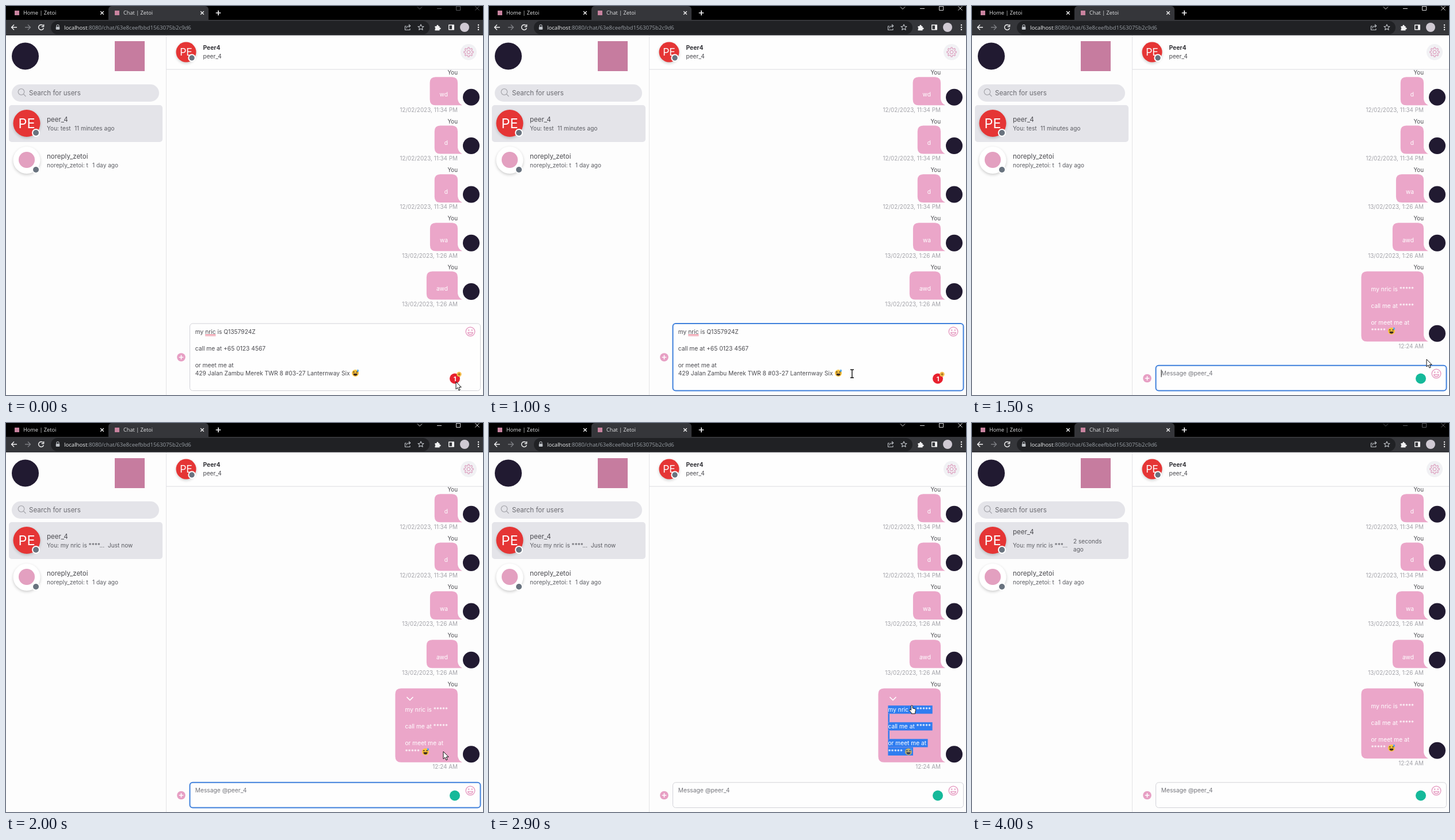
These frames come from a looping animation (829x675 px, 4100 ms). An HTML page with a canvas:

```html
<!DOCTYPE html>
<html lang="en">
<head>
<meta charset="utf-8">
<title>Chat</title>
<style>
html, body { margin: 0; width: 829px; height: 675px; overflow: hidden; background: #fdfdfd; }
canvas { display: block; }
</style>
</head>
<body>
<canvas id="stage" width="829" height="675"></canvas>
<script>
const ctx = document.getElementById('stage').getContext('2d');
const LOOP = 4100, STEP = 100;
const PINK = '#eba6c9', DARK = '#211a31', GREY = '#e4e4e9', RED = '#e53535';

// Moments (ms) at which the state changes
const FOCUS = 400, SENT = 1200, HOVER = 1800, UPDATED = 1700, SELECT = 2400,
      LEAVE = 3100, ONE_SECOND = 3000, BLUR = 3800, TWO_SECONDS = 3900;
const PATH = [[0, 782, 652], [700, 631, 638], [1100, 631, 638], [1500, 790, 613],
              [2000, 760, 570], [2400, 715, 480], [2800, 715, 480], [3200, 842, 540]];

function text(str, x, y, { size = 10.1, color = '#4b4b50', weight = 400, align = 'left', family = 'Inter' } = {}) {
  ctx.font = `${weight} ${size}px ${family}, sans-serif`;
  ctx.textAlign = align;
  ctx.fillStyle = color;
  ctx.fillText(str, x, y);
  return ctx.measureText(str).width;
}
function box(x, y, w, h, fill, r = 0) {
  ctx.fillStyle = fill;
  ctx.beginPath();
  ctx.roundRect(x, y, w, h, r);
  ctx.fill();
}
function disc(x, y, r, fill) {
  ctx.fillStyle = fill;
  ctx.beginPath();
  ctx.arc(x, y, r, 0, 7);
  ctx.fill();
}
function icon(x, y, d, { stroke, fill, width = 1.4 } = {}) {
  const path = new Path2D(d);
  ctx.save();
  ctx.translate(x, y);
  ctx.lineWidth = width;
  ctx.lineJoin = 'round';
  if (fill) { ctx.fillStyle = fill; ctx.fill(path); }
  if (stroke) { ctx.strokeStyle = stroke; ctx.stroke(path); }
  ctx.restore();
}
const ring = r => `M${r} 0A${r} ${r} 0 1 1 ${-r} 0A${r} ${r} 0 1 1 ${r} 0`;
const cross = r => `M${-r} ${-r}L${r} ${r}M${r} ${-r}L${-r} ${r}`;
const plus = r => `M${-r} 0H${r}M0 ${-r}V${r}`;

function browser(active) {
  const ui = { family: 'Open Sans', size: 9.2, color: '#e3e4e6' };
  const white = { stroke: '#f1f1f2' }, soft = { stroke: '#bdc1c6', width: 1.1 };
  box(0, 0, 829, 25, '#000');
  box(178, 0, 174, 26, '#35363a', [6, 6, 0, 0]);
  box(0, 24, 829, 27, '#35363a');
  box(78, 26, 658, 23, '#202124', 11.5);
  ['Home', 'Chat'].forEach((name, i) => {
    box(15 + i * 174, 8, 8, 8, '#c9839f');
    text(`${name} | Zetoi`, 30 + i * 174, 15, ui);
    icon(167 + i * 174, 12, cross(2.8), white);
  });
  icon(369, 12, plus(4.3), { stroke: '#f1f1f2', width: 1.7 });
  const win = { stroke: active ? '#d5d5d7' : '#55565a', width: 1 };
  icon(719, 3, 'M-4 -1.5L0 2.5L4 -1.5', win);
  icon(753, 4.5, 'M-4 0H4', win);
  icon(786, 4, 'M-3.5 -3.5H3.5V3.5H-3.5Z', win);
  icon(819, 4, cross(3.6), win);

  icon(14, 37, 'M5 0H-4M0 -4.5L-4.5 0L0 4.5', white);
  icon(38, 37, 'M-5 0H4M0 -4.5L4.5 0L0 4.5', { stroke: '#7d7f83' });
  icon(61, 37, 'M3.5 -3A4.5 4.5 0 1 0 4.4 1.2M4.6 -5V-1.3H.8', white);
  icon(90, 37, 'M-2 -1V-2.5A2 2 0 0 1 2 -2.5V-1', soft);
  box(86.7, 36, 6.6, 5, '#bdc1c6', 1);
  const host = text('localhost', 101, 40.5, { ...ui, size: 9.65, color: '#f1f3f4' });
  text(':8080/chat/63e8ceefbbd1563075b2c9d6', 101 + host, 40.5, { ...ui, size: 9.65, color: '#9aa0a6' });
  icon(698, 37, 'M-2 -2H-4.5V4.5H4V2M-2 2C-2 -1 0 -2.5 4.5 -2.5M2 -5L4.8 -2.5L2 0', soft);
  icon(721, 37, 'M0 -5L1.5 -1.7L5 -1.4L2.4 .9L3.2 4.4L0 2.6L-3.2 4.4L-2.4 .9L-5 -1.4L-1.5 -1.7Z', soft);
  icon(750, 38, 'M-4.5 -3H-1.5A1.6 1.6 0 1 1 1.5 -3H3.5V-.5A1.6 1.6 0 1 1 3.5 2.5V4.5H-4.5V2A1.5 1.5 0 0 0 -4.5 -.6Z', { fill: '#f1f1f2' });
  icon(774, 37, 'M-4.3 -4H4.3V4H-4.3Z', white);
  box(775, 33, 4, 8, '#f1f1f2');
  disc(797, 37, 8, '#cfc9d2');
  [33, 37, 41].forEach(y => disc(821, y, 1.2, '#f1f1f2'));
}

function shadow(draw) {
  ctx.save();
  ctx.shadowColor = '#0003';
  ctx.shadowBlur = 5;
  ctx.shadowOffsetY = 2;
  draw();
  ctx.restore();
}
function status(x, y, r, rim) {
  disc(x, y, r + 2, rim);
  disc(x, y, r, '#69737f');
}
function initials(x, y, r, rim) {
  shadow(() => disc(x, y, r, RED));
  text('PE', x, y + r * 0.36, { size: r, color: '#fff', align: 'center' });
  if (r > 20) status(x + 16, y + 16.5, 5, rim);
  else status(x + 10, y + 10, 4.7, rim);
}

function sidebar(t) {
  const sub = { color: '#5c5d63' };
  disc(33.5, 87, 23.5, DARK);
  box(189, 61, 52, 52, '#c67c9f');
  box(10, 136, 256, 30, GREY, 15);
  icon(26.5, 149, ring(5.3) + 'M3.8 3.8L8 8', { stroke: '#a9a9af', width: 1.3 });
  text('Search for users', 40, 155, { size: 11.5, color: '#6a6a70' });

  box(5, 172, 267, 64, GREY, 5);
  initials(36, 203.5, 23.5, '#fff');
  const wrapped = t >= TWO_SECONDS;
  text('peer_4', 71, wrapped ? 193 : 200.5, { size: 11.5 });
  if (wrapped) {
    text('You: my nric is ***...', 71, 216, sub);
    text('2 seconds', 176, 209, sub);
    text('ago', 176, 223, sub);
  } else if (t >= UPDATED) {
    text('You: my nric is ****...', 71, 216, sub);
    text(t < ONE_SECOND ? 'Just now' : '1 second ago', 177, 216, sub);
  } else {
    text('You: test', 71, 216, sub);
    text('11 minutes ago', 119, 216, sub);
  }

  shadow(() => disc(36, 267.5, 23.5, '#fff'));
  disc(36, 267, 14, '#e3a0c0');
  status(52, 284, 5, '#fff');
  text('noreply_zetoi', 71, 264.5, { size: 11.5 });
  text('noreply_zetoi: t', 71, 280, sub);
  text('1 day ago', 150, 280, sub);
  box(278, 51, 1, 624, '#e3e3e6');
}

function header() {
  box(279, 51, 550, 59, '#fefefe');
  box(279, 109.5, 550, 1, '#dedee2');
  initials(313, 80, 17.5, '#fff');
  text('Peer4', 342.5, 76, { weight: 700, size: 10.3, color: '#333338' });
  text('peer_4', 342.5, 91);
  disc(804, 80, 14, '#f1f1f4');
  let gear = '';
  for (let i = 0; i <= 96; i++) {
    const a = i / 96 * Math.PI * 2;
    const r = 7 + 1.2 * Math.tanh(3 * Math.cos(8 * a));
    gear += `${i ? 'L' : 'M'}${r * Math.cos(a)} ${r * Math.sin(a)}`;
  }
  icon(804, 80, gear, { stroke: '#dda0bf', width: 1.2 });
  icon(804, 80, ring(2.8), { stroke: '#dda0bf', width: 1.2 });
}

function emoji(x, y) {
  disc(x, y, 6, '#f9c23c');
  icon(x, y, 'M-4 -1.3Q-2.7 -3 -1.4 -1.3M1.4 -1.3Q2.7 -3 4 -1.3', { stroke: '#2f2a24', width: 1.1 });
  icon(x, y, 'M-3.6 .8H3.6A3.6 3.6 0 0 1 -3.6 .8Z', { fill: '#3c2a22' });
  icon(x + 4.4, y - 4.5, 'M0 -2.2Q3.4 2 0 2.3Q-3.4 2 0 -2.2Z', { fill: '#4aa5ee' });
}

function bubble(left, top, bottom) {
  icon(0, 0, `M${left + 10} ${top}H775Q785 ${top} 785 ${top + 10}V${bottom - 11}Q786 ${bottom - 3} 793 ${bottom}
    H${left + 10}Q${left} ${bottom} ${left} ${bottom - 10}V${top + 10}Q${left} ${top} ${left + 10} ${top}Z`, { fill: PINK });
}
function frameMessage(top, bottom, left, time) {
  text('You', 785, top - 4, { size: 9.8, align: 'right' });
  bubble(left, top, bottom);
  disc(808.5, bottom - 14, 14.5, DARK);
  text(time, 785, bottom + 11.5, { size: 9.9, color: '#a3a3a9', align: 'right' });
}

function messages(t) {
  const night = '12/02/2023, 11:34 PM', morning = '13/02/2023, 1:26 AM';
  const list = [['wd', night], ['d', night], ['d', night], ['wa', morning], ['awd', morning]];
  const white = { color: '#fff', size: 10.2 };
  const sent = t >= SENT;
  list.slice(sent ? 1 : 0).forEach(([word, time], i) => {
    const top = 123.2 + i * 84.35;
    ctx.font = '10.2px Inter, sans-serif';
    frameMessage(top, top + 49, 751 - ctx.measureText(word).width, time);
    text(word, 768, top + 33.8, { ...white, align: 'right' });
  });
  if (!sent) return;

  const hover = t >= HOVER && t < LEAVE, selected = t >= SELECT && t < LEAVE;
  const shift = hover ? 6.5 : 0;
  frameMessage(460.6, 582.3 + shift, 676.5, '12:24 AM');
  if (hover) icon(702, 478, 'M-5.5 -2.5L0 3L5.5 -2.5', { stroke: '#fff', width: 1.6 });
  ['my nric is *****', '', 'call me at *****', '', 'or meet me at', '*****'].forEach((line, i) => {
    const y = 494.7 + shift + i * 14.5;
    const extra = i === 5 ? 18 : 2.5;
    ctx.font = '10.2px Inter, sans-serif';
    if (selected) box(693.5, y - 11, ctx.measureText(line).width + extra, 14.3, '#2f7df0');
    text(line, 693.5, y, white);
  });
  emoji(729, 564 + shift);
  if (selected) {
    ctx.globalAlpha = 0.3;
    disc(729, 570.5, 6.2, '#2f7df0');
    ctx.globalAlpha = 1;
  }
}

function composer(t) {
  const sent = t >= SENT, focused = t >= FOCUS && t < SELECT;
  const top = sent ? 623.8 : 551, middle = sent ? 646 : 609.5, face = sent ? 638 : 565;
  ctx.beginPath();
  ctx.roundRect(319.5, top, 505, 667.5 - top, 5);
  ctx.fillStyle = '#fefefe';
  ctx.fill();
  ctx.strokeStyle = focused ? '#3f80dc' : '#d3d3d8';
  ctx.lineWidth = focused ? 2 : 1;
  ctx.stroke();

  disc(304.5, middle, 7.3, '#e79fc4');
  icon(304.5, middle, plus(3.8), { stroke: '#fff', width: 1.6 });
  icon(807, face, ring(7.8) + 'M-4.3 1.5H4.3A4.4 4.4 0 0 1 -4.3 1.5Z', { stroke: '#e79fc4', width: 1.5 });
  disc(804.2, face - 2.5, 1.3, '#e79fc4');
  disc(809.8, face - 2.5, 1.3, '#e79fc4');

  const x = 328.7, font = { size: 10.25 };
  if (sent) {
    text('Message @peer_4', x, 641, { ...font, color: '#74757b' });
    if (t < SENT + 500) box(328.5, 631, 1, 13, '#222');
    disc(780, 646.5, 9, '#15b99a');
    return;
  }
  const before = text('my ', x, 568.5, font);
  const word = text('nric', x + before, 568.5, font);
  text(' is Q1357924Z', x + before + word, 568.5, font);
  box(x + before, 570, word, 1, '#e5566d');
  box(x + before, 572, word, 1, '#f0a0b0');
  text('call me at +65 0123 4567', x, 597.5, font);
  text('or meet me at', x, 626.5, font);
  const end = text('429 Jalan Zambu Merek TWR 8 #03-27 Lanternway Six', x, 641, font);
  emoji(x + end + 9.5, 637);
  disc(780, 646.5, 9, '#e8212f');
  text('1', 780, 650.5, { size: 11, weight: 700, color: '#fff', align: 'center' });
  disc(787.5, 639, 4.2, '#f6bf4f');
  icon(787.5, 639, plus(2.3), { stroke: '#8a5a10', width: 1 });
}

function pointer(t) {
  if (t >= 3200) return;
  const i = PATH.findIndex(key => key[0] > t);
  const [t0, x0, y0] = PATH[i - 1], [t1, x1, y1] = PATH[i];
  const p = (t - t0) / (t1 - t0), e = p * p * (3 - 2 * p);
  const x = x0 + (x1 - x0) * e, y = y0 + (y1 - y0) * e;
  if (t >= 200 && t < SENT) {
    icon(x, y, 'M-3 -7H-1Q0 -7 0 -6V6Q0 7 -1 7H-3M3 -7H1Q0 -7 0 -6M0 6Q0 7 1 7H3', { stroke: '#111', width: 1.4 });
  } else if (t >= 2300 && t < 3000) {
    icon(x, y, 'M-1.3 9V1.5Q0 -.5 1.3 1.5V5.5L5.5 6.6Q7 7 6.7 9L5.8 13V15H-.8V13.5L-4.5 9Q-4 7 -2.8 7.8Z', { fill: '#fff', stroke: '#111', width: 1 });
  } else {
    icon(x, y, 'M0 0V13L3 10.2L5 15L7.2 14L5.2 9.4H9.2Z', { fill: '#fff', stroke: '#111', width: 1 });
  }
}

function draw(now) {
  const t = Math.floor(now % LOOP / STEP) * STEP;
  box(0, 0, 829, 675, '#fdfdfd');
  sidebar(t);
  messages(t);
  header();
  composer(t);
  browser(t >= FOCUS && t < BLUR);
  pointer(t);
}
const start = performance.now();
(function tick() {
  draw(performance.now() - start);
  requestAnimationFrame(tick);
})();
</script>
</body>
</html>
```
